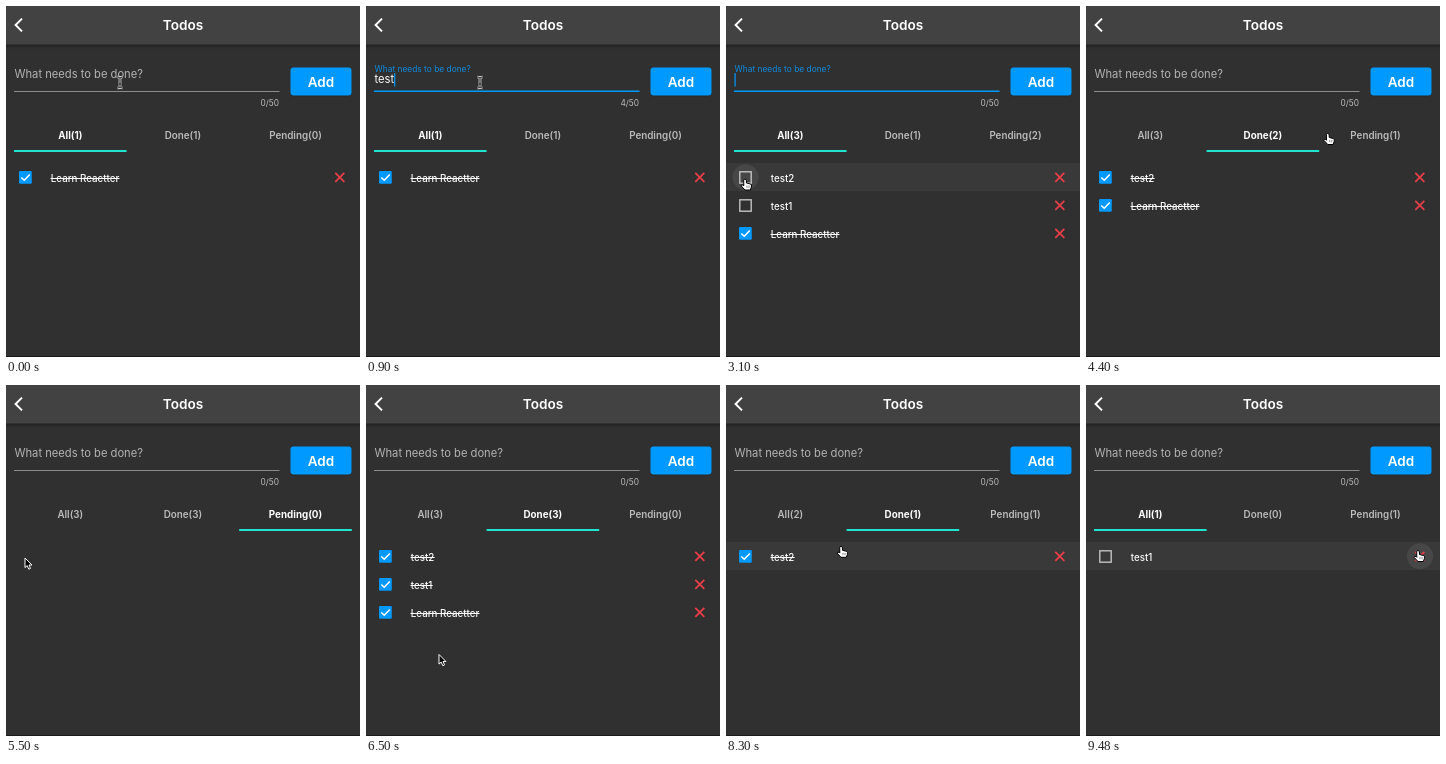
These frames come from a looping animation (354x351 px, 9650 ms). An HTML page with a canvas:

```html
<!DOCTYPE html>
<html lang="en">
<head>
<meta charset="utf-8">
<title>Todos</title>
<style>
  html, body { margin: 0; width: 100%; height: 100%; overflow: hidden; background: #303030; }
  canvas { display: block; width: 354px; height: 351px; }
</style>
</head>
<body>
<canvas id="stage"></canvas>
<script>
const W = 354, H = 351, LOOP = 9650;
const BLUE = '#0099ff', LABEL_BLUE = '#0f8bdf', GREY = '#b4b4b4', TEAL = '#1fe5d0', RED = '#ea3f48';
const ROW_TOP = 157, ROW_H = 28, TAB_X = 8, TAB_W = 112.6, FIELD_W = 265.5;
const MOVE = 400, SLIDE = 300, FLOAT = 200, KEY_DELAY = 115;

const canvas = document.getElementById('stage');
const ctx = canvas.getContext('2d');
const ratio = window.devicePixelRatio || 1;
canvas.width = W * ratio;
canvas.height = H * ratio;
ctx.scale(ratio, ratio);

// Newest first; all times in ms.
const todos = [
  { name: 'test2', added: 2300, removed: 9480, done: 3300, undone: Infinity },
  { name: 'test1', added: 1300, removed: Infinity, done: 5500, undone: 6900 },
  { name: 'Learn Reactter', added: 0, removed: 7800, done: 0, undone: Infinity },
];
const tabClicks = [
  { at: 0, tab: 0 }, { at: 3900, tab: 1 }, { at: 4700, tab: 2 }, { at: 5900, tab: 1 }, { at: 8700, tab: 0 },
];
const focusAt = 200, blurAt = 3300;

const point = (x, y) => ({ x, y });
const tabSpot = i => point(TAB_X + TAB_W * (i + 0.5) - 4, 127.5);
const checkSpot = row => point(19, ROW_TOP + ROW_H * row + 16);
const removeSpot = row => point(332, ROW_TOP + ROW_H * row + 8.5);

// Where the pointer arrives, and when; every move takes MOVE ms.
const stops = [
  { at: 0, to: point(114, 76.5) },
  { at: 1900, to: point(121, 72.5) },
  { at: 3100, to: checkSpot(0) },
  { at: 3700, to: tabSpot(1) },
  { at: 4570, to: tabSpot(2) },
  { at: 5300, to: checkSpot(0) },
  { at: 5900, to: tabSpot(1) },
  { at: 6500, to: point(73, 269.5) },
  { at: 6900, to: checkSpot(1) },
  { at: 7700, to: removeSpot(1) },
  { at: 8300, to: point(115, 161.3) },
  { at: 8700, to: tabSpot(0) },
  { at: 9200, to: removeSpot(0) },
];

const clamp = v => Math.max(0, Math.min(1, v));
const mix = (a, b, p) => a + (b - a) * p;
const ease = v => { const p = clamp(v); return p * p * (3 - 2 * p); };

function pointerAt(t) {
  return stops.reduce((pos, { at, to }) => {
    const p = ease((t - at) / MOVE + 1);
    return point(mix(pos.x, to.x, p), mix(pos.y, to.y, p));
  }, stops[0].to);
}

function rect(x, y, w, h, color, radius = 0) {
  ctx.fillStyle = color;
  ctx.beginPath();
  ctx.roundRect(x, y, w, h, radius);
  ctx.fill();
}

function line(points, color, width) {
  ctx.strokeStyle = color;
  ctx.lineWidth = width;
  ctx.beginPath();
  points.forEach(([x, y]) => ctx.lineTo(x, y));
  ctx.stroke();
}

function text(str, x, y, size, color, weight = 400, align = 'left') {
  ctx.font = `${weight} ${size}px Inter, sans-serif`;
  ctx.textAlign = align;
  ctx.fillStyle = color;
  ctx.fillText(str, x, y);
  return ctx.measureText(str).width;
}

function drawHeader() {
  const shadow = ctx.createLinearGradient(0, 38, 0, 43);
  shadow.addColorStop(0, 'rgba(0,0,0,.32)');
  shadow.addColorStop(1, 'rgba(0,0,0,0)');
  rect(0, 38, W, 5, shadow);
  rect(0, 0, W, 38.5, '#424242');
  line([[16, 12.6], [9.6, 19], [16, 25.4]], '#fff', 2);
  text('Todos', 177, 24, 13.6, '#fff', 600, 'center');
}

function typedText(t) {
  const next = todos.findLast(d => d.added > t);
  if (!next) return '';
  const firstKey = next.added - 750;
  return next.name.slice(0, Math.max(0, Math.floor((t - firstKey) / KEY_DELAY) + 1));
}

function drawField(t, step) {
  const float = ease((step - focusAt + 100) / FLOAT) - ease((step - blurAt + 100) / FLOAT);
  const focused = t >= focusAt && t < blurAt;
  const typed = typedText(t);

  text('What needs to be done?', 8.5, mix(71.8, 65.5, float), 11.18 * mix(1, 0.75, float),
    focused ? LABEL_BLUE : GREY);
  const width = text(typed, 8.5, 77.2, 11.18, '#fff');
  if (focused) rect(8.5 + width, 67, 1.2, 13.5, BLUE);
  rect(8, focused ? 84.5 : 85, FIELD_W, focused ? 1.6 : 1, focused ? BLUE : '#8c8c8c');
  text(`${typed.length}/50`, 273, 100.2, 8.3, '#bdbdbd', 400, 'right');

  rect(284.5, 62, 61, 28.4, 'rgba(0,0,0,.15)', 3);
  rect(284.5, 61.5, 61, 28, BLUE, 3);
  text('Add', 314.9, 80.8, 13.5, '#fff', 600, 'center');
}

function drawTabs(step, current, counts) {
  const { at, tab } = tabClicks[current];
  const from = tabClicks[Math.max(0, current - 1)].tab;
  const slide = ease((step - at + 100) / SLIDE);
  ['All', 'Done', 'Pending'].forEach((name, i) => {
    const active = i === tab;
    text(`${name}(${counts[i]})`, TAB_X + TAB_W * (i + 0.5), 133, 9.8,
      active ? '#fff' : '#bcbcbc', active ? 700 : 600, 'center');
  });
  rect(TAB_X + TAB_W * mix(from, tab, slide), 144, TAB_W, 2, TEAL);
}

function drawRow(todo, index, pointer) {
  const top = ROW_TOP + index * ROW_H, mid = top + 14.3;
  if (pointer.y >= top && pointer.y < top + ROW_H) {
    rect(0, top, W, ROW_H, '#393939');
    for (const x of [19.5, 334])
      if (Math.abs(pointer.x - x) < 12) rect(x - 13, mid - 13, 26, 26, 'rgba(255,255,255,.075)', 13);
  }
  if (todo.checked) {
    rect(13, mid - 6.3, 12.8, 12.8, BLUE, 1.2);
    line([[15.3, mid + 0.2], [18.2, mid + 3], [23.8, mid - 2.8]], '#fff', 1.5);
  } else {
    ctx.strokeStyle = '#c2c2c2';
    ctx.lineWidth = 1.4;
    ctx.strokeRect(13.8, mid - 5.5, 11.4, 11.4);
  }
  const width = text(todo.name, 44.8, mid + 4.4, 9.75, '#fff', 500);
  if (todo.checked) rect(44.5, mid + 0.7, width + 0.6, 1, '#fff');
  for (const s of [-1, 1]) line([[329.3, mid - 4.5 * s], [338.3, mid + 4.5 * s]], RED, 1.8);
}

const HAND = new Path2D('M-1.3 .8Q0 -.9 1.3 .8L1.5 4L5.5 5Q6.9 5.5 6.4 8L5.3 11H0L-3.8 6.9Q-3.6 5.1 -2 6L-1.2 6.8Z');
const ARROW = new Path2D('M0 0V9.6L2.2 7.6L3.8 11.2L5.5 10.4L4 7H7Z');
const IBEAM = new Path2D('M-2.5 -5.5Q0 -5.5 0 -4Q0 -5.5 2.5 -5.5M0 -4V4M-2.5 5.5Q0 5.5 0 4Q0 5.5 2.5 5.5M-1.5 1.5H1.5');

function outlined(shape, color, width) {
  ctx.strokeStyle = color;
  ctx.lineWidth = width;
  ctx.stroke(shape);
}

function drawPointer({ x, y }, rowCount) {
  const overField = x > 8 && x < 273 && y > 54 && y < 88;
  const clickable = (y > 114 && y < 147) || (y >= ROW_TOP && y < ROW_TOP + rowCount * ROW_H);
  ctx.save();
  ctx.translate(x, y);
  ctx.lineJoin = 'round';
  if (overField) {
    outlined(IBEAM, '#e8e8e8', 2.6);
    outlined(IBEAM, '#111', 1);
  } else {
    const shape = clickable ? HAND : ARROW;
    ctx.fillStyle = clickable ? '#fff' : '#000';
    ctx.fill(shape);
    outlined(shape, clickable ? '#000' : '#fff', 1);
    if (clickable) for (const dx of [2, 4]) line([[dx, 6.6], [dx, 8.8]], '#333', 0.6);
  }
  ctx.restore();
}

function draw(t) {
  const step = Math.floor(t / 100) * 100;
  const items = todos.filter(d => t >= d.added && t < d.removed)
    .map(d => ({ name: d.name, checked: t >= d.done && t < d.undone }));
  const lists = [items, items.filter(d => d.checked), items.filter(d => !d.checked)];
  const current = tabClicks.findLastIndex(c => c.at <= t);
  const rows = lists[tabClicks[current].tab];
  const pointer = pointerAt(step);

  rect(0, 0, W, H, '#303030');
  drawHeader();
  drawField(t, step);
  drawTabs(step, current, lists.map(l => l.length));
  rows.forEach((row, i) => drawRow(row, i, pointer));
  rect(0, 350, W, 1, '#1a1a1a');
  drawPointer(pointer, rows.length);
}

const start = performance.now();
function frame() {
  draw((performance.now() - start) % LOOP);
  requestAnimationFrame(frame);
}
frame();
</script>
</body>
</html>
```
